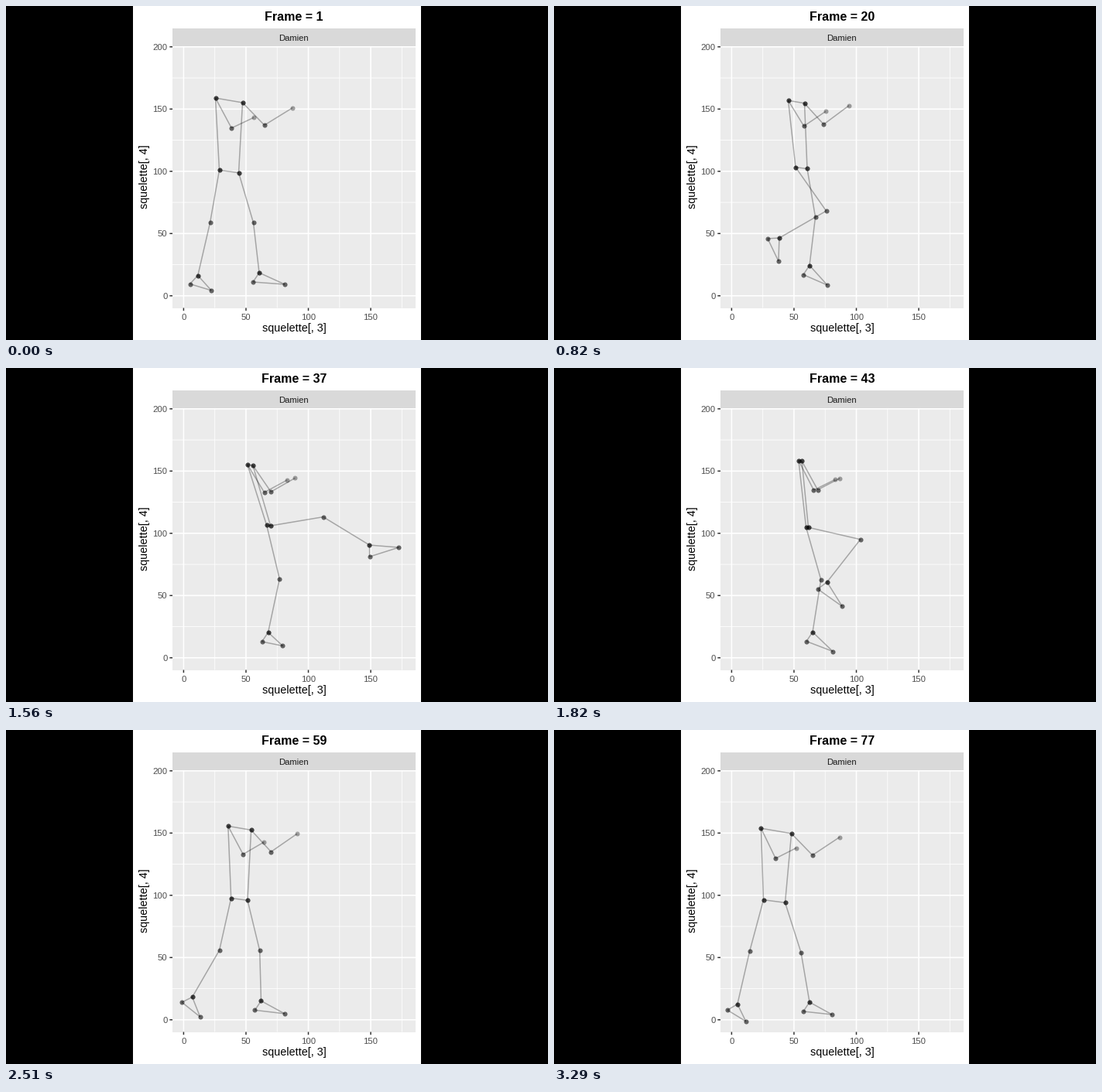
A matplotlib script that plays this animation: 700x432 px, repeating every 3.33 s.

```python
import math
import numpy as np
import matplotlib.pyplot as plt
from matplotlib.animation import FuncAnimation
from matplotlib.collections import LineCollection
from matplotlib.patches import Rectangle

W, H, DPI = 700, 432, 100
PX = 72 / DPI  # points per pixel
POSES = 77
TICK_MS, TICKS = 10, 333
POSE_TICKS = 4.324  # ticks per pose

plt.rcParams["font.family"] = "Liberation Sans"

# Guard, knee lift, top of the kick, recoil, step back, guard
KEYS = [0, 19, 29, 42, 51, 66]
# The kicking leg also needs its push-off and its extension
KICK_KEYS = [0, 13, 19, 26, 29, 33, 42, 51, 66]


def track(times, values):
    """Monotone cubic through key values, sampled at every pose, then held."""
    t = np.array(times, float)
    p = np.array(values, float).reshape(len(t), -1)
    h = np.diff(t)[:, None]
    slope = np.diff(p, axis=0) / h
    a, b = slope[:-1], slope[1:]
    same = a * b > 0
    m = np.zeros_like(p)
    m[1:-1] = np.where(same, 2 * a * b / np.where(same, a + b, 1), 0)
    k = np.minimum(np.arange(POSES), t[-1])
    i = np.clip(np.searchsorted(t, k, side="right") - 1, 0, len(h) - 1)
    d = h[i]
    u = (k - t[i])[:, None] / d
    ease = u * u * (3 - 2 * u)
    return (p[i] * (1 - ease) + p[i + 1] * ease
            + d * u * (1 - u) * (m[i] * (1 - u) - m[i + 1] * u))


def polar(angle, length):
    """Offset at an angle in degrees, 0 pointing down and 90 forward."""
    a = np.radians(angle)
    return np.hstack([length * np.sin(a), length * np.cos(a)])


def build_joints():
    """Rear (r) and front (f) joints of all poses, in stage pixels."""
    hips = track(KEYS, [(288, 214), (319.5, 209.5), (350, 202.5),
                        (327, 206), (319.5, 214.5), (284.5, 221.5)])
    chest = track(KEYS, [(288, 122), (313, 124), (312, 132.5),
                         (318, 120), (315.5, 122.5), (287, 130.5)])
    hands = track(KEYS, [(345, 138), (366, 132.5), (371.5, 143.5),
                         (366, 143.5), (366, 134.5), (341, 145.5)])
    stand = track(KEYS, [(327, 345), (330, 335.5), (342, 342.5),
                         (334, 341.5), (329, 347.5), (330, 352)])
    toe = track(KEYS, [(360, 360), (353, 361), (354, 350.5),
                       (360, 366.5), (360.5, 366), (359, 368)])
    turn = track(KEYS, [25, 15, -6, -3, 11, 28])
    thigh = track(KICK_KEYS, [-10, 3, 35, 125, 145, 112, 77, -7, -15])
    shin = track(KICK_KEYS, [-13, -40, -60, 55, 125, 105, -38, -44, -13])
    foot = track(KICK_KEYS, [42, 16, -2, 108, 162, 120, 32, 18, 26])

    # The body's turn spreads each left-right pair around its middle.
    j = {}
    for name, mid, spread in (("hip", hips, (1, 0.13)),
                              ("shoulder", chest, (1.4, 0.24)),
                              ("elbow", (chest + hands) / 2 + (-4, 26), (1.7, -0.15)),
                              ("wrist", hands, (2, -0.5))):
        half = turn * spread / 2
        j[name + "_r"], j[name + "_f"] = mid - half, mid + half

    bend = np.hstack([14 - 0.33 * turn, 0 * turn])
    j["knee_f"] = (j["hip_f"] + stand) / 2 + bend
    j["ankle_f"], j["heel_f"], j["toe_f"] = stand, stand + (-8, 12), toe

    j["knee_r"] = j["hip_r"] + polar(thigh, 69)
    j["ankle_r"] = j["knee_r"] + polar(shin, 70)
    j["heel_r"] = j["ankle_r"] + polar(foot - 85, 15)
    j["toe_r"] = j["ankle_r"] + polar(foot, 36 - 0.4 * turn)
    return j


SIDE = [("shoulder", "elbow"), ("elbow", "wrist"), ("shoulder", "hip"),
        ("hip", "knee"), ("knee", "ankle"), ("ankle", "heel"),
        ("heel", "toe"), ("toe", "ankle")]
BONES = [(f"{a}_{s}", f"{b}_{s}") for s in "rf" for a, b in SIDE]
BONES += [("shoulder_r", "shoulder_f"), ("hip_r", "hip_f")]

joints = build_joints()
# pose, bone, end, xy
bones = np.stack([np.stack([joints[a], joints[b]], axis=1) for a, b in BONES], axis=1)

fig = plt.figure(figsize=(W / DPI, H / DPI), dpi=DPI, facecolor="black")
ax = fig.add_axes([0, 0, 1, 1])
ax.set_xlim(0, W)
ax.set_ylim(H, 0)
ax.axis("off")

LEFT, RIGHT, TOP, BOTTOM = 215, 529, 53, 390.5


def px_x(v):
    return 229.4 + 1.611 * v


def px_y(v):
    return 374.8 - 1.61 * v


def box(x0, y0, x1, y1, color):
    ax.add_patch(Rectangle((x0, y0), x1 - x0, y1 - y0, fc=color, lw=0, zorder=0))


def line(xs, ys, color, width):
    ax.plot(xs, ys, color=color, lw=width * PX, solid_capstyle="butt",
            snap=False, zorder=1)


def label(x, y, s, size, color="black", ha="center", **kw):
    return ax.text(x, y, s, fontsize=size * PX, color=color, ha=ha,
                   va="baseline", rotation_mode="anchor", **kw)


box(164, 0, 536, H, "white")
box(LEFT, 29, RIGHT, TOP, "#d9d9d9")
box(LEFT, TOP, RIGHT, BOTTOM, "#ebebeb")

for v in range(25, 200, 50):
    line([px_x(v)] * 2, [TOP, BOTTOM], "white", 0.8)
    line([LEFT, RIGHT], [px_y(v)] * 2, "white", 0.8)
for v in range(0, 201, 50):
    y = px_y(v)
    line([LEFT, RIGHT], [y, y], "white", 1.6)
    line([LEFT - 3.7, LEFT], [y, y], "#333333", 1.5)
    label(208.5, y + 4, str(v), 11.3, "#4d4d4d", "right")
    if v < 200:
        x = px_x(v)
        line([x, x], [TOP, BOTTOM], "white", 1.6)
        line([x, x], [BOTTOM, BOTTOM + 3.7], "#333333", 1.5)
        label(x, 406, str(v), 11.3, "#4d4d4d")

label(371.5, 45, "Damien", 11.3, "#1a1a1a")
label(372, 421, "squelette[, 3]", 14.4)
label(183, 221, "squelette[, 4]", 14.4, rotation=90)
title = label(372, 19, "", 16, weight="bold")

limbs = LineCollection([], colors=[(0, 0, 0, 0.3)], linewidths=1.5 * PX, zorder=2)
ax.add_collection(limbs)
dots = ax.scatter([], [], s=(6 * PX) ** 2, color=[(0, 0, 0, 0.35)],
                  linewidths=0, zorder=3)


def draw(tick):
    k = math.ceil((tick + 0.35) / POSE_TICKS) - 1
    title.set_text(f"Frame = {k + 1}")
    limbs.set_segments(bones[k])
    dots.set_offsets(bones[k].reshape(-1, 2))
    return title, limbs, dots


anim = FuncAnimation(fig, draw, frames=TICKS, interval=TICK_MS,
                     repeat=True, repeat_delay=0)
plt.show()
```
